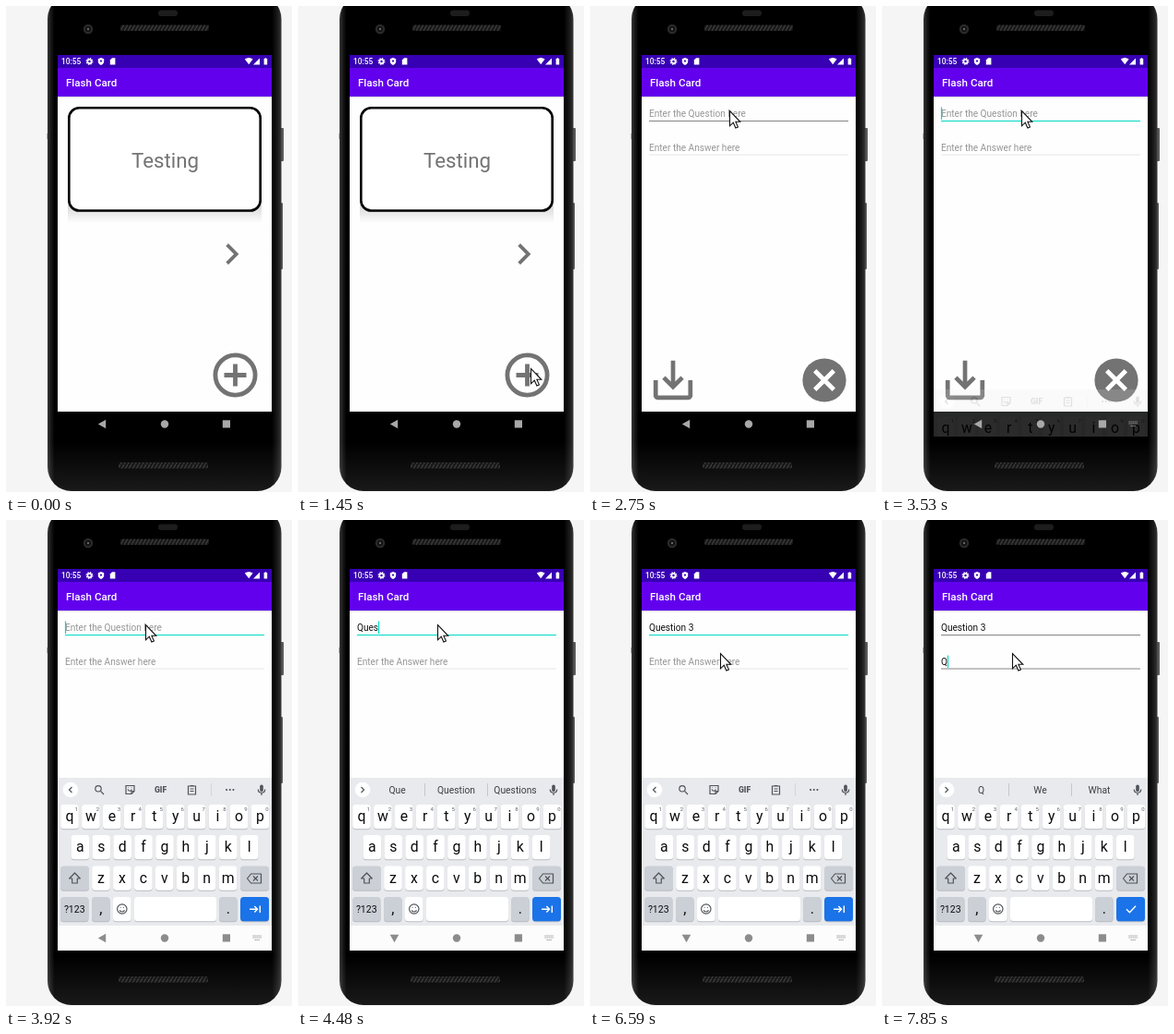
Write an HTML page that moves like this. It is 310 px wide and 526 px high and loops after 8000 ms.

```html
<!DOCTYPE html>
<html lang="en">
<head>
<meta charset="utf-8">
<title>Flash Card</title>
<style>
html, body { margin: 0; width: 100%; height: 100%; overflow: hidden; background: #f5f5f5 }
svg { display: block; font-family: Roboto, sans-serif }
text { white-space: pre }
.mid { text-anchor: middle }
.line { fill: none; stroke: #50545a; stroke-width: 1.2 }
.gray { fill: #737373 }
.field { font-size: 10.1px }
</style>
</head>
<body>
<svg width="310" height="526" viewBox="0 0 310 526">
  <defs>
    <clipPath id="screen"><path d="M56 53h232v413H56z"/></clipPath>
    <pattern id="mesh" width="4" height="7" patternUnits="userSpaceOnUse" y="20">
      <path d="M0 7L4 0" fill="none" stroke="#3c3c3c" stroke-width="1.2"/>
    </pattern>
    <linearGradient id="shade" x2="0" y2="1">
      <stop stop-color="#000" stop-opacity=".16"/><stop offset="1" stop-color="#000" stop-opacity="0"/>
    </linearGradient>
    <linearGradient id="rim">
      <stop stop-color="#383838"/><stop offset=".012" stop-color="#1c1c1c"/><stop offset=".03"/>
      <stop offset=".96"/><stop offset=".985" stop-color="#1c1c1c"/><stop offset="1" stop-color="#383838"/>
    </linearGradient>
    <linearGradient id="sheen" x2="0" y2="1">
      <stop offset=".9" stop-color="#fff" stop-opacity="0"/><stop offset="1" stop-color="#fff" stop-opacity=".1"/>
    </linearGradient>
    <g id="window">
      <path d="M56 53h232v413H56z"/>
      <path d="M56 98h232v341H56z" fill="#fefefe"/>
      <path d="M56 53h232v14H56z" fill="#3700b3"/>
      <path d="M56 67h232v31H56z" fill="#6200ee"/>
      <path d="M56 98h232v2H56z" fill="url(#shade)"/>
      <text x="65" y="87" font-size="11.6" font-weight="500" fill="#fff">Flash Card</text>
    </g>
  </defs>

  <!-- phone body -->
  <rect x="296" y="132" width="5" height="36" rx="1" fill="#5a5a5a"/>
  <rect x="296" y="213" width="4" height="72" rx="1" fill="#5a5a5a"/>
  <path d="M44.5 138h2v6h-2z" fill="#777"/>
  <rect x="45" y="-12" width="253.5" height="537" rx="26" fill="url(#rim)"/>
  <rect x="45" y="-12" width="253.5" height="537" rx="26" fill="url(#sheen)"/>
  <rect x="165" y="4.5" width="21" height="6.5" rx="3.2" fill="#1d1d1d"/>
  <circle cx="89" cy="25" r="5.2" fill="#2a2a2a"/>
  <circle cx="89" cy="25" r="3" fill="#111"/>
  <circle cx="89" cy="25" r="1.2" fill="#666"/>
  <rect x="124" y="20.5" width="96" height="6.5" rx="2" fill="#181818"/>
  <rect x="124" y="20.5" width="96" height="6.5" rx="2" fill="url(#mesh)"/>
  <rect x="122" y="494" width="97" height="6.5" rx="2" fill="#181818"/>
  <rect x="122" y="494" width="97" height="6.5" rx="2" fill="url(#mesh)"/>

  <g clip-path="url(#screen)">
    <g id="home">
      <use href="#window"/>
      <path d="M67 215h210v20H67z" fill="url(#shade)"/>
      <rect x="68.3" y="110.3" width="207.4" height="111.2" rx="11" fill="#fff" stroke="#000" stroke-width="2.6"/>
      <text class="mid gray" x="172.5" y="175" font-size="22.3">Testing</text>
      <path class="gray" transform="translate(222 245.7) scale(1.9)" d="M10 6L8.59 7.41 13.17 12l-4.58 4.59L10 18l6-6z"/>
      <g fill="none" stroke="#737373" stroke-width="4.8">
        <circle cx="248.5" cy="399.5" r="21.6"/>
        <path d="M236.5 399.5h24M248.5 387.5v24"/>
      </g>
    </g>
    <g id="form">
      <use href="#window"/>
      <text id="question" class="field" x="64" y="120"/>
      <text id="answer" class="field" x="64" y="157"/>
      <path id="qLine" d="M64 124.5h216"/>
      <path id="aLine" d="M64 161h216"/>
      <path id="caret" d="M0 0v13.5" stroke="#03dac5" stroke-width="1.2"/>
      <path class="gray" transform="translate(61.8 376.8) scale(2.35)" d="M19 12v7H5v-7H3v7c0 1.1.9 2 2 2h14c1.1 0 2-.9 2-2v-7zm-6 .67l2.59-2.58L17 11.5l-5 5-5-5 1.41-1.41L11 12.67V3h2z"/>
      <circle class="gray" cx="254" cy="405" r="23.6"/>
      <path d="M243.7 394.7l20.6 20.6m0-20.6l-20.6 20.6" stroke="#fff" stroke-width="4.8"/>
    </g>
    <g id="keyboard">
      <path d="M56 279h232v160H56z" fill="#e8eaed"/>
      <path d="M56 439h232v27H56z" fill="#fcfcfc"/>
      <g id="keys"></g>
      <circle cx="70" cy="292" r="8.3" fill="#fff"/>
      <path id="chevron" class="line" d="M-1.5-3L1.5 0L-1.5 3"/>
      <g fill="#50545a">
        <rect x="275.2" y="286.5" width="3.6" height="7.5" rx="1.8"/>
        <path class="line" d="M273.3 291.5c0 5 7.4 5 7.4 0M277 295.3v2.7"/>
      </g>
      <g id="tools" class="line">
        <circle cx="100" cy="290.8" r="3.2"/><path d="M102.5 293.3l3.5 3.7"/>
        <path d="M130 287.5h9v6l-3 3h-6zM139 293.5h-3v3M132 291.5q2 3.5 4.5 0M132.5 289.5h.6m2.6 0h.6"/>
        <text class="mid" x="167.5" y="295.3" font-size="8.6" font-weight="900" fill="#50545a" stroke="none">GIF</text>
        <path d="M197.5 288h8v9h-8zM199.5 287.5h4M199.5 291h4m-4 2.5h4"/>
        <path d="M222.5 285v14" stroke="#d4d6da"/>
        <path d="M239 292h.1m3.6 0h.1m3.6 0h.1" stroke-width="2" stroke-linecap="round"/>
      </g>
      <g id="hints" font-size="10.3" fill="#3c4043">
        <path d="M137.5 285v14M205.5 285v14" stroke="#c4c7cc"/>
        <text class="mid" x="107.5" y="296"/><text class="mid" x="171.5" y="296"/><text class="mid" x="235.5" y="296"/>
      </g>
    </g>

    <!-- system bars -->
    <g fill="#fff">
      <text x="60" y="63" font-size="8.4" font-weight="500">10:55</text>
      <circle cx="90.5" cy="60" r="2.1" fill="none" stroke="#fff" stroke-width="1.7"/>
      <circle cx="90.5" cy="60" r="3.4" fill="none" stroke="#fff" stroke-width="1.1" stroke-dasharray="1.5 1.17"/>
      <path d="M103 56l3.2 1.2v2.6q0 3-3.2 4.2q-3.2-1.2-3.2-4.2v-2.6z"/>
      <circle cx="103" cy="59.6" r="1.1" fill="#3700b3"/>
      <path d="M115 56.3h3.4v7.2h-5.6v-5z"/>
      <path d="M258.8 57.6q4.4-3.2 8.8 0l-4.4 5.7zM275 56.5v7h-7zM279.6 57h1v-.8h1.6v.8h1v6.5h-3.6z"/>
    </g>
    <g id="nav">
      <path id="back" d="M-4.7 0L3.7-4.8V4.8z"/>
      <circle cx="172" cy="452.5" r="4.2"/>
      <path d="M234.8 448.3h8.2v8.2h-8.2z"/>
      <path id="switch" d="M267.5 450h10m-10 2h10m-8 2.5h6" fill="none" stroke-width="1.2" stroke-dasharray="1.2 .8"/>
    </g>
  </g>
  <circle id="press" r="14.5" fill="#000" fill-opacity=".1" stroke="#000" stroke-opacity=".35"/>
  <path id="pointer" d="M.5.5V16.8L4.3 13.2L6.9 19L9.4 17.9L6.9 12.3H11.8z" fill="#fff" stroke="#111" stroke-width="1.1"/>
</svg>
<script>
const $ = id => document.getElementById(id);
const show = (id, on) => $(id).style.display = on ? '' : 'none';
const move = (id, x, y, more = '') => $(id).setAttribute('transform', `translate(${x} ${y}) ${more}`);
const clamp = v => Math.max(0, Math.min(1, v));
const within = (t, spans) => spans.some(([a, b]) => t >= a && t < b);
const latest = (list, t) => list.reduce((v, [at, value]) => t >= at ? value : v, undefined);

const GRAY = '#cbcfd6';
function key(x, y, w, fill, label = '', size = 15.8) {
  return `<rect x="${x}" y="${y + 1}" width="${w}" height="26.3" rx="3.5" fill="#b9bcc2"/>
    <rect x="${x}" y="${y}" width="${w}" height="26.3" rx="3.5" fill="${fill}"/>
    <text class="mid" x="${x + w / 2}" y="${y + (size > 12 ? 18 : 17)}" font-size="${size}" fill="#0c0c0c">${label}</text>`;
}
function row(letters, x, y) {
  return [...letters].map((c, i) => key(x + i * 22.93 - 9.8, y, 19.6, '#fff', c)).join('');
}
$('keys').innerHTML =
  row('qwertyuiop', 69, 308) + row('asdfghjkl', 80.3, 341) + row('zxcvbnm', 103, 374.5) +
  [...'1234567890'].map((d, i) => `<text class="mid" x="${76.5 + i * 22.93}" y="315" font-size="6" fill="#5f6368">${d}</text>`).join('') +
  key(59, 374.5, 31, GRAY) + key(254, 374.5, 31, GRAY) + key(59, 408, 30.5, GRAY, '?123', 10.5) +
  key(93, 408, 19.6, GRAY, ',') + key(116, 408, 19.6, '#fff') + key(139, 408, 89, '#fff') +
  key(231, 408, 19.6, GRAY, '.') + key(254, 408, 31, '#1a73e8') +
  `<g class="line" stroke-linejoin="round">
    <path d="M74.5 382l5.8 6h-3v5h-5.6v-5h-3z"/>
    <path d="M261.5 388l4-5h11v10h-11zM268 385.5l5 5m0-5l-5 5"/>
    <circle cx="125.8" cy="421" r="5.2"/><path d="M123 422.5q2.8 3 5.6 0M123.6 419.3h.8m2.8 0h.8"/>
    <path id="next" d="M264 421.3h8.5m-3.2-3.3l3.3 3.3l-3.3 3.3M275.3 417.5v7.6" stroke="#fff" stroke-width="1.4"/>
    <path id="done" d="M265 421.3l3.4 3.4l6.6-7" stroke="#fff" stroke-width="1.4"/>
  </g>`;

// [start, end, number of visible steps]
const bursts = [[410, 980, 8], [2070, 2750, 10], [6180, 6590, 6]];
function snap(t) {
  for (const [a, b, n] of bursts) {
    const step = (b - a) / (n - 1);
    if (t >= a && t < b) return a + Math.floor((t - a) / step) * step;
  }
  return t;
}

const route = [[410, 275, 481], [980, 252, 392], [1995, 252, 392], [2296, 148, 231],
  [2750, 151, 113], [6100, 151, 113], [6590, 141, 144], [8000, 141, 144]];
function pointerAt(t) {
  const i = Math.max(1, route.findIndex(p => p[0] > t));
  const [a, x, y] = route[i - 1], [b, x2, y2] = route[i];
  const u = clamp((t - a) / (b - a)), e = u * (2 - u);
  return [x + (x2 - x) * e, y + (y2 - y) * e];
}

const typed = [[0, ''], [4100, 'Q'], [4250, 'Qu'], [4400, 'Que'], [4480, 'Ques'], [4640, 'Quest'],
  [4790, 'Questi'], [4870, 'Questio'], [5100, 'Question'], [5170, 'Question '], [5720, 'Question 3']];
const words = [[0, ''], [4250, 'Q We What'], [4400, 'Que Question Questions'], [4640, 'Ques Question Questions'],
  [4790, 'Quest Question Questions'], [4870, 'Questio Question Questions'],
  [5100, 'Question Questions Questioned'], [5400, 'is and for'], [5950, ''], [7850, 'Q We What']];
const presses = [[1370, 1450], [2980, 3070], [3220, 3300], [6740, 6810], [7080, 7160]];
const carets = [[3300, 6260], [7160, 8000]];

function scale(id, s) {
  move(id, 172, 259.5, `scale(${s}) translate(-172 -259.5)`);
}
function field(id, text, hint) {
  $(id).textContent = text || hint;
  $(id).setAttribute('fill', text ? '#111' : '#969696');
}
function line(id, color, width) {
  $(id).setAttribute('stroke', color);
  $(id).setAttribute('stroke-width', width);
}

function draw(t) {
  const s = snap(t);

  // the form grows in over the home screen
  const p = 1 - (1 - clamp((s - 2145) / 400)) ** 5;
  scale('home', 1 + .05 * p);
  scale('form', .85 + .15 * p);
  $('form').style.opacity = clamp((s - 2145) / 83);
  show('home', s < 2600);

  const question = latest(typed, t), answer = t >= 7620 ? 'Q' : '';
  field('question', question, 'Enter the Question here');
  field('answer', answer, 'Enter the Answer here');
  const onAnswer = t >= 7080;
  if (t >= 2980 && !onAnswer) line('qLine', '#03dac5', 1.2);
  else line('qLine', '#858585', 1);
  line('aLine', t < 2600 || t >= 6810 ? '#858585' : '#e6e6e6', 1);

  show('caret', within(t, carets));
  const id = onAnswer ? 'answer' : 'question';
  const width = (onAnswer ? answer : question) ? $(id).getComputedTextLength() : 0;
  move('caret', 64.5 + width, onAnswer ? 146.5 : 109.5);

  const open = t >= 3920;
  show('keyboard', t >= 3450);
  $('keyboard').style.opacity = open ? 1 : t < 3530 ? .08 : .17;
  move('keyboard', 0, open ? 0 : t < 3530 ? 146 : 136);
  const list = latest(words, t);
  show('tools', !list);
  show('hints', list);
  $('hints').querySelectorAll('text').forEach((el, i) => el.textContent = list.split(' ')[i] || '');
  move('chevron', 70, 292, list ? '' : 'scale(-1 1)');
  show('next', !onAnswer);
  show('done', onAnswer);

  const tint = open ? '#8c8c8c' : '#a8a8a8';
  $('nav').setAttribute('fill', tint);
  $('switch').setAttribute('stroke', tint);
  show('switch', t >= 3450);
  move('back', 104.5, 452.5, t >= 4100 ? 'rotate(-90)' : '');

  const [x, y] = pointerAt(s);
  show('pointer', t >= 410);
  move('pointer', x, y);
  show('press', within(t, presses));
  move('press', x, y);
}

const start = performance.now();
function tick() {
  draw((performance.now() - start) % 8000);
  requestAnimationFrame(tick);
}
tick();
</script>
</body>
</html>
```
